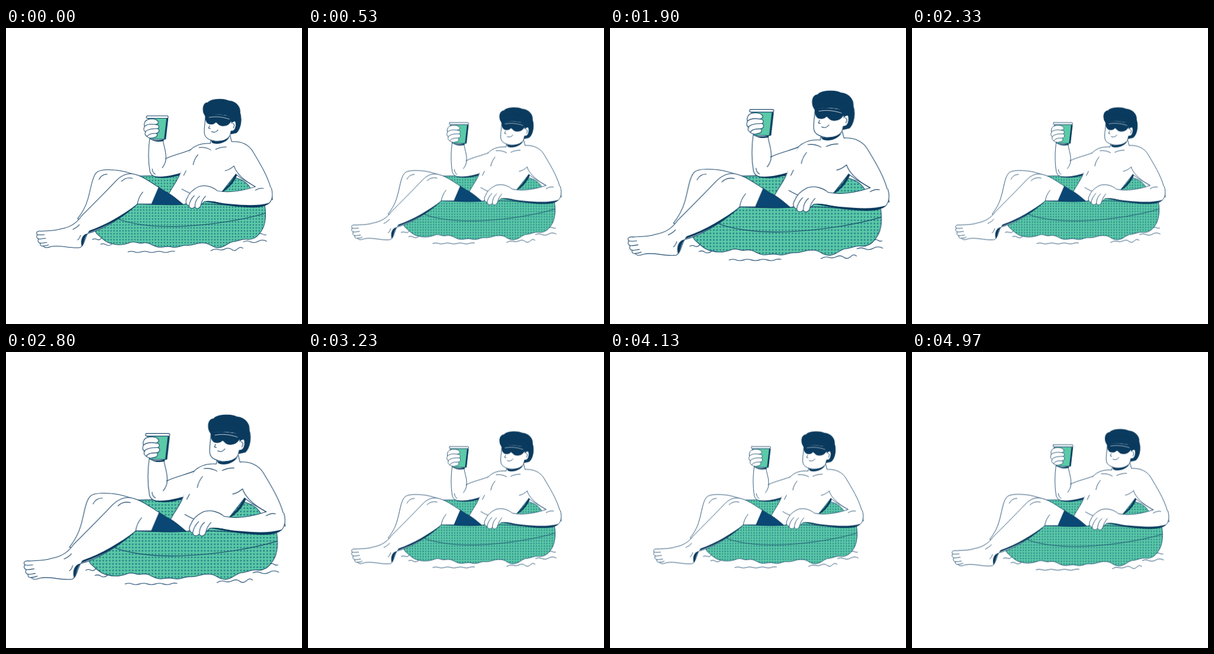
An HTML page without scripts that plays this animation: 500x500 px, repeating every 5.01 s.

```html
<!DOCTYPE html>
<html lang="en">
<head>
<meta charset="utf-8">
<title>Pool float</title>
<style>
  html, body { margin: 0; width: 100%; height: 100%; overflow: hidden; background: #fff; }
  svg { display: block; width: 100vw; height: 100vh; }
  #art {
    transform-origin: 250px 250px;
    animation: pulse 5.01s infinite;
    stroke: #17456b; stroke-width: 1; fill: none;
    stroke-linecap: round; stroke-linejoin: round;
  }
  .skin { fill: #fff; }
  .navy { fill: #0a3a5e; stroke: #0a3a5e; }
  .shade { fill: #0a3a5e; stroke: none; }
  .tube { fill: url(#dots); }
  .bare { stroke: none; }

  /* Beat of 900 ms, cut off by the end of the loop */
  @keyframes pulse {
    0%, 17.964%, 35.928%, 53.892%, 71.856%, 89.82% {
      transform: scale(1); animation-timing-function: cubic-bezier(.4, .35, .75, 1);
    }
    2.994%, 20.958%, 38.922%, 56.886%, 74.85%, 92.814% {
      transform: scale(1.14); animation-timing-function: cubic-bezier(.25, 0, .6, .75);
    }
    6.653%, 24.617%, 42.581%, 60.545%, 78.509%, 96.473% {
      transform: scale(1); animation-timing-function: cubic-bezier(.33, .35, .7, .75);
    }
    10.645%, 28.609%, 46.573%, 64.537%, 82.501% {
      transform: scale(.889); animation-timing-function: cubic-bezier(.45, 0, .8, .65);
    }
    100% { transform: scale(.901); }
  }
</style>
</head>
<body>
<svg viewBox="0 0 500 500">
  <defs>
    <pattern id="dots" width="5" height="5" patternUnits="userSpaceOnUse">
      <path d="M0 0H5V5H0Z" fill="#5bcaa8"/>
      <circle cx="2.5" cy="2.5" r="1.15" fill="#1c6a80"/>
    </pattern>
  </defs>
  <g id="art">
    <g id="water">
      <path d="M146 357q4-2 8 0t7-2M160 365q5-2 9 1t10-1"/>
      <path d="M206 378q6-2 11 0t11 0t12 0t12 0t12 0t11 0t10-1"/>
      <path d="M346 376q6-4 12-2t12-1t11 1t10-1t9-1"/>
      <path d="M401 361q6-3 12 0t13-1t14 0M426 348q4-2 7 0t6 1"/>
    </g>

    <g id="float">
      <path class="tube" d="M226 250C260 249 350 249 381 252C395 254 407 260 413 271L418 300H230Z"/>
      <path class="tube" d="M222 297C255 299 280 299 310 297C350 295 400 304 437 300C440 320 437 337 428 347C423 354 416 357 409 357C398 355 391 361 382 361C374 363 370 370 359 371C347 371 345 363 334 363C322 362 316 368 305 367C296 366 292 372 281 370C270 367 267 371 257 370C246 368 243 361 231 363C222 365 219 359 210 362C200 366 188 367 179 364C169 363 160 353 153 347L149 340Z"/>
      <path d="M186 321C205 330 245 337 295 335C345 333 400 324 437 313"/>
    </g>

    <g id="far-leg">
      <path class="skin" d="M226 250C213 247 201 241 184 240C172 239 157 239 152 245C145 253 143 274 138 290C134 304 128 313 121 322L150 335L205 270Z"/>
      <path d="M157 256C160 250 165 247 171 247"/>
    </g>

    <g id="body">
      <path class="skin" d="M346 188L345 195C331 194 320 197 311 206C303 219 297 233 294 246C289 259 281 268 275 280L299 298L364 282L366 275L388 247L399 255L421 268L450 290L447 270C441 248 427 226 417 209C410 197 397 191 381 192L378 180Z"/>
      <path d="M326 202C334 201 341 203 346 206M354 205C360 202 366 201 372 201M324 214C320 219 317 225 316 231M304 241L300 249M385 233C379 238 375 240 370 241M385 233C388 243 399 256 421 268M297 272C304 276 310 279 314 280"/>
      <path class="shade" d="M388 246C383 256 376 267 363 277L369 275C379 268 386 259 390 249Z"/>
      <path class="shade" d="M346 190C355 193 370 191 378 184C371 195 356 198 348 194Z"/>
    </g>

    <g id="shorts">
      <path class="navy" style="fill:#0a4775" d="M258 269C254 278 249 287 246 297C264 299 282 299 299 298C291 291 284 285 276 280C270 277 264 273 258 269Z"/>
    </g>

    <g id="near-leg">
      <path class="skin" d="M258 269C243 260 229 248 211 246C201 246 194 250 187 257C167 278 145 300 127 318C119 330 106 337 93 339C82 343 70 342 60 343C53 342 50 345 53 349C51 352 52 355 55 356C53 360 55 363 58 363C57 367 60 369 63 368C65 372 71 371 76 369C91 366 106 372 122 371C132 372 133 354 138 347C165 340 199 319 222 297H246Z"/>
      <path d="M222 297C223 290 226 283 231 277M195 259C200 254 207 252 214 254M53 349C57 350 61 349 65 349M55 356C59 357 63 355 67 355M58 363C62 364 66 362 69 362M63 368C67 368 70 367 72 366M113 340C117 338 121 336 124 332M121 358C124 356 125 353 126 350"/>
      <path class="shade" d="M222 297C201 319 166 337 138 346L141 342C170 332 198 315 222 297ZM138 347C129 348 125 358 128 369C132 365 132 353 138 347Z"/>
    </g>

    <g id="rest-arm">
      <path class="skin bare" d="M421 268C400 275 377 279 357 275C349 268 336 264 325 268C315 273 309 279 306 287C302 293 304 299 309 300C310 305 315 306 319 302C322 307 327 305 329 299L335 293C347 291 356 295 368 297C393 301 420 304 438 299C449 296 452 284 448 270Z"/>
      <path d="M421 268C400 275 377 279 357 275C349 268 336 264 325 268C315 273 309 279 306 287C302 293 304 299 309 300C310 305 315 306 319 302C322 307 327 305 329 299C331 297 333 295 335 293C347 291 356 295 368 297C393 301 420 304 438 299C449 296 452 284 448 270M309 300C310 294 313 288 318 283M319 302C319 295 322 288 327 284M329 299C330 294 333 288 337 284M421 274C426 271 431 270 435 271"/>
      <path class="shade" d="M336 293C350 291 360 296 378 297C402 299 424 301 445 295C437 304 416 304 397 302C376 301 356 296 336 293Z"/>
    </g>

    <g id="raised-arm">
      <path class="skin bare" d="M243 184C240 205 240 225 243 242C245 250 253 253 264 252C277 251 288 249 294 246L311 206C300 211 283 214 270 221C270 210 266 200 265 184Z"/>
      <path d="M243 184C240 205 240 225 243 242C245 250 253 253 264 252C277 251 288 249 294 246M311 206C300 211 283 214 269 221M265 188C266 200 271 208 270 221C270 227 267 232 264 236M247 238C247 242 249 245 252 247"/>
      <path class="shade" d="M248 250C263 253 281 249 294 245L292 249C279 253 260 256 248 250ZM244 188C251 190 258 190 267 188L266 191C258 193 250 192 244 188Z"/>
    </g>

    <g id="cup">
      <path fill="#5bcaa8" d="M240 152H273L269 188H244Z"/>
      <path class="shade" d="M271 153H274L270 188H267Z"/>
      <path class="skin" d="M238 148.500H273Q275 150.500 273 152.500H238Q236 150.500 238 148.500Z"/>
      <path class="skin" d="M239 155C243 153 253 153 256 157C259 160 256 163 252 163C258 163 260 167 256 170C260 172 259 177 254 178C257 180 255 185 250 185C246 187 240 186 238 183C234 181 234 177 236 176C232 174 232 169 234 167C232 162 235 156 239 155Z"/>
      <path d="M234 166C239 162 246 162 252 163M235 175C241 170 248 170 256 170M238 183C242 178 248 178 254 178"/>
    </g>

    <g id="head">
      <path class="navy" d="M338 151L334 144C331 135 334 126 341 126C345 120 365 118 376 123C388 124 396 133 395 143C399 155 396 171 389 177L380 179Z"/>
      <path class="skin" d="M337 144C337 158 334 168 335 178C336 186 343 189 353 191C364 192 373 189 378 182L380 174C387 175 389 166 388 160C386 154 382 156 381 161L379 144Z"/>
      <path class="navy" d="M337 149L334 142C337 132 366 130 380 137C388 142 390 151 386 157L382 159C381 152 377 148 371 147C357 145 344 145 337 149Z"/>
      <path class="navy" d="M338 148C350 145 370 147 388 152V157L380 157C377 163 371 166 364 165C359 165 357 159 354 159C352 162 348 163 343 162C337 160 336 151 338 148Z"/>
      <path d="M343 151C354 149 366 150 377 154" stroke="#fff" stroke-width=".7"/>
      <path d="M347 175C351 177 355 176 358 172M344 165L342 169L345 170M383 161Q387 163 384 169"/>
    </g>
  </g>
</svg>
</body>
</html>
```
